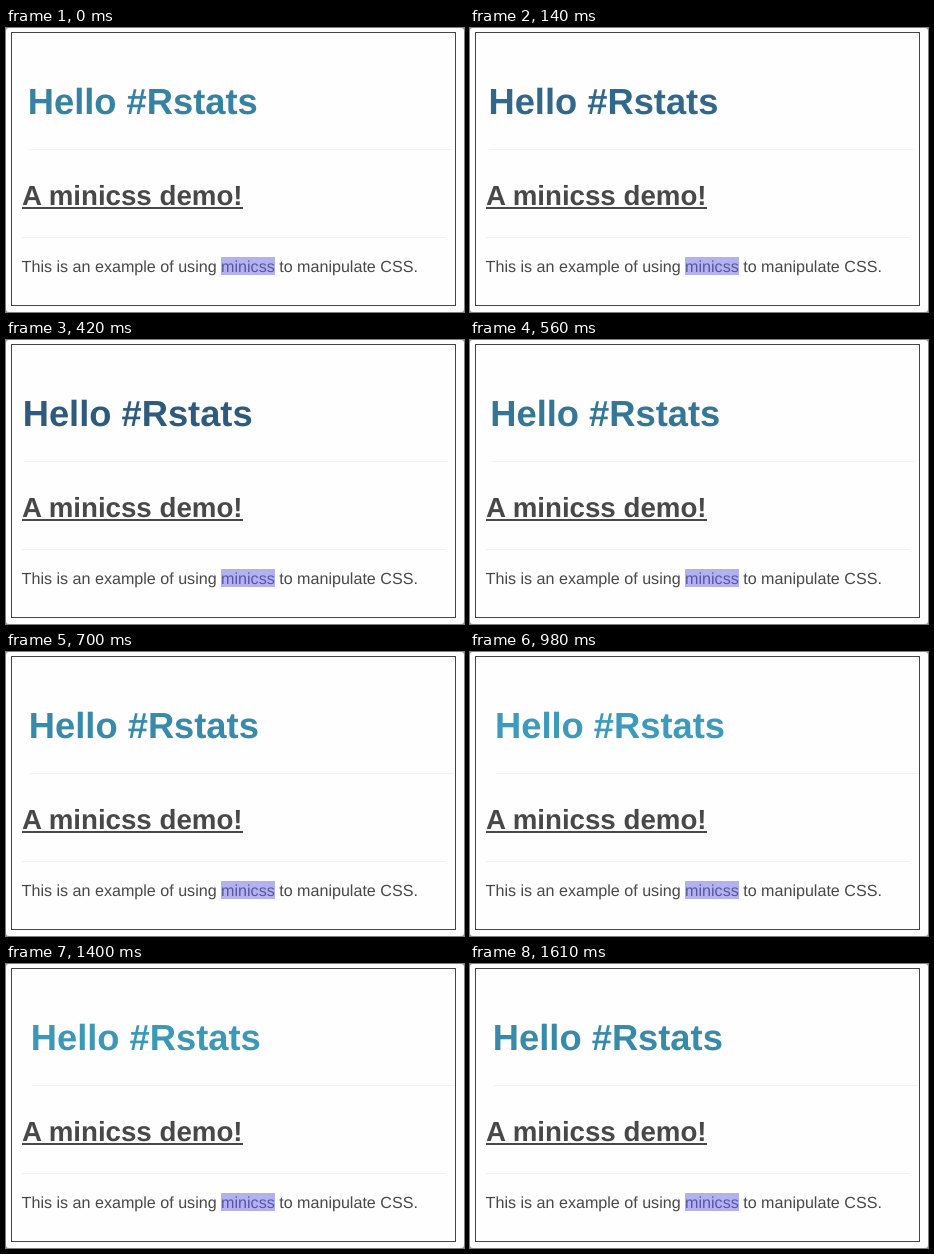
Recreate the animation shown at these times as an HTML page. Size 458 by 284 pixels, loop 1680 ms.

```html
<!DOCTYPE html>
<html lang="en">
<head>
<meta charset="utf-8">
<style>
  html, body { margin: 0; height: 100%; overflow: hidden; background: #999; }
  svg {
    display: block; background: #fefefe; border-radius: 3px; fill: #484848;
    font-family: "Liberation Sans", Arial, sans-serif; text-rendering: geometricPrecision;
  }
  .title { font-weight: bold; font-size: 36.3px; }
  .subtitle { font-weight: bold; font-size: 27.7px; }
  .body { font-size: 16.1px; }
  .rule { fill: #f2f2f2; }
</style>
</head>
<body>
<svg width="458" height="284" viewBox="0 0 458 284">
  <g id="heading">
    <rect class="rule" x="16" y="121" width="424" height="1"/>
    <text id="title" class="title" x="15.3" y="86.3">Hello #Rstats</text>
  </g>
  <rect x="5.5" y="4.5" width="444" height="273" fill="none" stroke="#444"/>
  <text class="subtitle" x="16" y="177">A minicss demo!</text>
  <rect x="16" y="179" width="221" height="2"/>
  <rect class="rule" x="16" y="209" width="424" height="1"/>
  <text class="body" x="15.6" y="244">This is an example of using minicss to manipulate CSS.</text>
  <rect x="215" y="229" width="54" height="18" fill="#6866ea" opacity=".5"/>
</svg>
<script>
  const LOOP = 1680, HALF = LOOP / 2, STEP = 70, START = 315;
  const DARK = [44, 80, 113], LIGHT = [60, 157, 188];
  const heading = document.getElementById('heading');
  const title = document.getElementById('title');

  const bezier = (a, b, s) => 3 * a * s * (1 - s) ** 2 + 3 * b * s * s * (1 - s) + s ** 3;

  // CSS "ease": cubic-bezier(.25, .1, .25, 1)
  function ease(x) {
    let lo = 0, hi = 1;
    for (let i = 0; i < 24; i++) {
      const mid = (lo + hi) / 2;
      if (bezier(.25, .25, mid) < x) lo = mid; else hi = mid;
    }
    return bezier(.1, 1, lo);
  }

  function draw(now) {
    const time = Math.floor((now % LOOP) / STEP) * STEP;
    const phase = (time - START + LOOP) % LOOP;
    const p = ease(1 - Math.abs(phase / HALF - 1));
    heading.setAttribute('transform', `translate(${10 * p} 0)`);
    title.setAttribute('fill', `rgb(${DARK.map((c, i) => Math.round(c + (LIGHT[i] - c) * p))})`);
  }

  const begin = performance.now();
  function tick() {
    draw(performance.now() - begin);
    requestAnimationFrame(tick);
  }
  tick();
</script>
</body>
</html>
```
